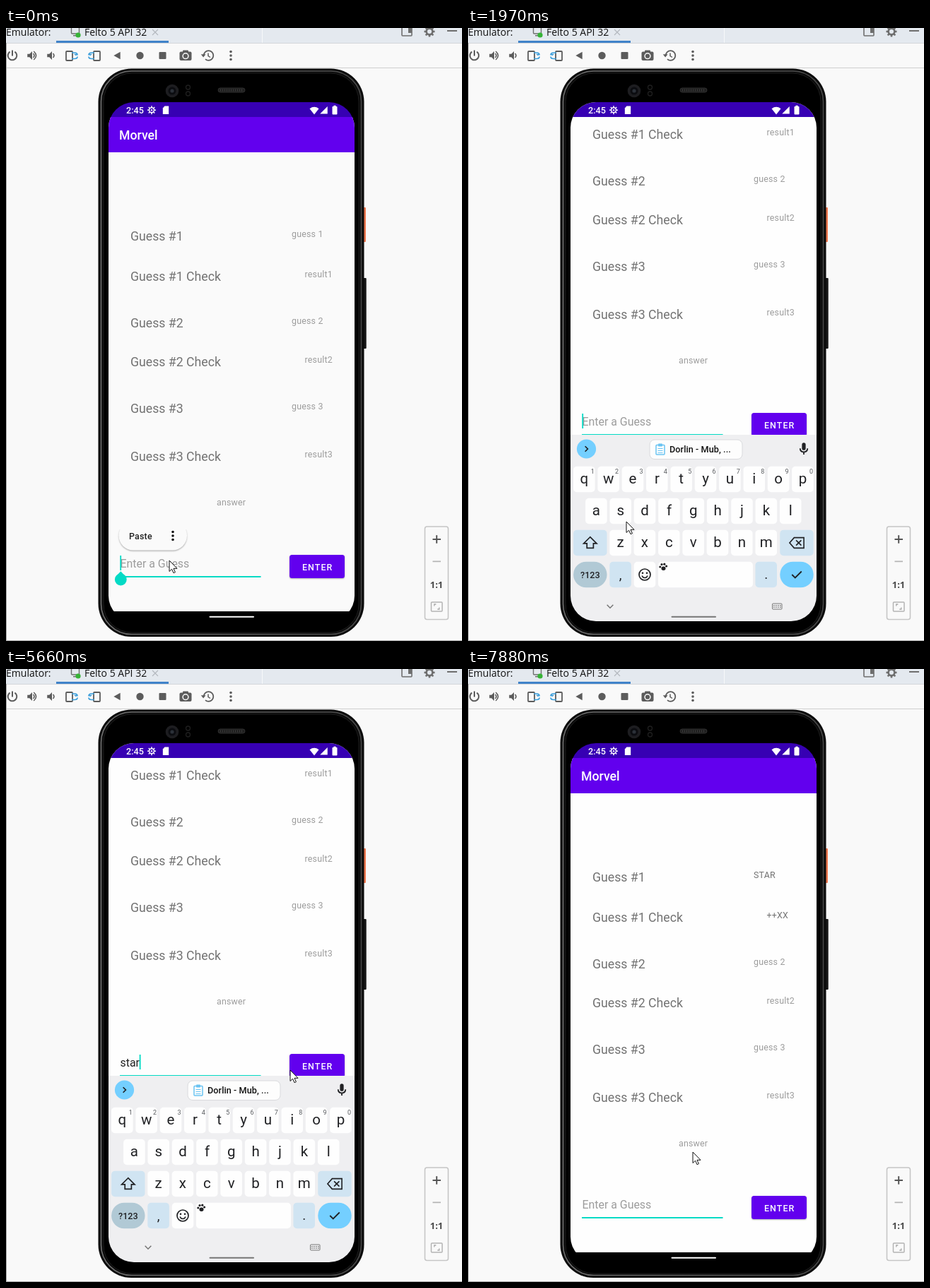
Write an HTML page with a canvas that moves like this. It is 645 px wide and 868 px high and loops after 8000 ms.

```html
<!DOCTYPE html>
<html lang="en">
<head>
<meta charset="utf-8">
<title>Guessing app</title>
<style>
html, body { margin: 0; width: 100%; height: 100%; overflow: hidden; background: #f9f9f9; }
canvas { display: block; width: 645px; height: 868px; }
</style>
</head>
<body>
<canvas id="stage"></canvas>
<script>
const W = 645, H = 868, LOOP = 8000;
const dpr = window.devicePixelRatio || 1;
const stage = document.getElementById('stage');
const layer = document.createElement('canvas');
for (const c of [stage, layer]) { c.width = W * dpr; c.height = H * dpr; }
const main = stage.getContext('2d'), board = layer.getContext('2d');
let g = main;

const PURPLE = '#6200ee', TEAL = '#03dac5', GREY = '#5c5c5c', INK = '#202124';
const SKY = '#74cfff', PALE = '#d0e4f2', HINT = '#9c9c9c', LABEL = '#737373';
const WHITE = '#fefefe', PANEL = '#f9f9f9', EDGE = '#a5a5a5';
const ROBOTO = 'Roboto, sans-serif', UI = '"Open Sans", sans-serif';

// ---------- drawing helpers ----------
function rr(x, y, w, h, r, fill, stroke, lw = 1) {
  g.beginPath();
  g.roundRect(x, y, w, h, r);
  if (fill) { g.fillStyle = fill; g.fill(); }
  if (stroke) { g.strokeStyle = stroke; g.lineWidth = lw; g.stroke(); }
}
function rect(x, y, w, h, fill) { g.fillStyle = fill; g.fillRect(x, y, w, h); }
function dot(x, y, r, fill) {
  g.beginPath(); g.arc(x, y, r, 0, 7);
  g.fillStyle = fill; g.fill();
}
function ring(x, y, r, color, lw, a = 0, b = Math.PI * 2) {
  g.beginPath(); g.arc(x, y, r, a, b);
  g.strokeStyle = color; g.lineWidth = lw; g.stroke();
}
function text(s, x, y, size, color, o = {}) {
  g.font = `${o.weight || 400} ${size}px ${o.font || ROBOTO}`;
  g.textAlign = o.align || 'left';
  g.letterSpacing = (o.gap || 0) + 'px';
  g.fillStyle = color;
  g.fillText(s, x, y);
}
// Path centred on x, y; path units are a 24 by 24 box
function icon(d, x, y, size, color, lw = 0) {
  g.save();
  g.translate(x - size / 2, y - size / 2);
  g.scale(size / 24, size / 24);
  const p = new Path2D(d);
  if (lw) { g.strokeStyle = color; g.lineWidth = lw * 24 / size; g.stroke(p); }
  else { g.fillStyle = color; g.fill(p); }
  g.restore();
}
function shadow(fn, blur, dy, alpha) {
  g.save();
  g.shadowColor = `rgba(0,0,0,${alpha})`;
  g.shadowBlur = blur * dpr;
  g.shadowOffsetY = dy * dpr;
  fn();
  g.restore();
}
function gear(x, y, r, color, lw) {
  ring(x, y, r * .58, color, lw);
  for (let i = 0; i < 8; i++) {
    const a = i * Math.PI / 4, c = Math.cos(a), s = Math.sin(a);
    g.beginPath();
    g.moveTo(x + c * r * .65, y + s * r * .65);
    g.lineTo(x + c * r, y + s * r);
    g.stroke();
  }
}

// ---------- time ----------
const BEATS = [[0, 1], [400, 6], [1180, 6], [1970, 4], [2540, 2], [2810, 5], [3490, 3],
  [3940, 7], [4870, 1], [4990, 5], [5660, 2], [5900, 1], [6050, 2], [6330, 1],
  [6450, 7], [7370, 1], [7490, 3], [7880, 1], [LOOP, 1]];
function snap(t) {
  let i = 0;
  while (BEATS[i + 1][0] <= t) i++;
  const [a, n] = BEATS[i], step = (BEATS[i + 1][0] - a) / n;
  return a + Math.floor((t - a) / step + 1e-6) * step;
}
const clamp = v => Math.max(0, Math.min(1, v));

const SENT = 6330;
const PRESSES = [
  { c: 's', down: 2250, typed: 2390, up: 2530 },
  { c: 't', down: 3485, typed: 3635, up: 3780 },
  { c: 'a', down: 4200, typed: 4330, up: 4460 },
  { c: 'r', down: 5120, typed: 5250, up: 5385 }
];
const BLINKS = [0, 800, ...PRESSES.map(p => p.typed), SENT];
const PATH = [[0, 231, 754], [400, 231, 754], [920, 218, 757], [1180, 216, 755], [1570, 216, 753],
  [1970, 224, 699], [2255, 217, 684], [2540, 217, 684], [2810, 226, 681], [3350, 298, 645],
  [3640, 298, 645], [3790, 250, 663], [3940, 216, 676], [4200, 185, 680], [4471, 186, 680],
  [4870, 250, 643], [5124, 266, 643], [5392, 268, 641], [5660, 402, 568], [5780, 431, 553],
  [5900, 445, 548], [6050, 448, 567], [6450, 448, 567], [7370, 339, 657], [7750, 318, 684],
  [LOOP, 318, 684]];
function pointer(t) {
  let i = 0;
  while (i < PATH.length - 2 && PATH[i + 1][0] <= t) i++;
  const [a, x, y] = PATH[i], [b, u, v] = PATH[i + 1], k = clamp((t - a) / (b - a));
  return [Math.round(x + (u - x) * k), Math.round(y + (v - y) * k)];
}
// Keyboard slide, its opacity, and how far the page is pushed up
function slide(t) {
  if (t < 3000) {
    const p = clamp((t - 850) / 470), k = 1 - p;
    return { dy: Math.round(123 * k ** 1.6), alpha: clamp(p * 1.45), pan: Math.round(201 * (1 - k ** 2.67)) };
  }
  const q = clamp((t - 6250) / 400);
  return { dy: Math.round(124 * q), alpha: clamp(1 - 1.06 * q), pan: Math.round(201 * (1 - q) ** 2.26) };
}

// ---------- emulator window ----------
function toolWindow() {
  rect(0, 0, W, H, PANEL);
  rect(0, 0, W, 21, '#e4e9ef');
  rect(0, 21, W, 1, '#d3d6da');
  rect(0, 56, W, 1, '#cfcfcf');
  rect(362, 0, 1, 21, '#f6f8fa');
  rect(0, 21, 1, H, EDGE);
  rect(0, H - 1, W, 1, EDGE);
  text('Emulator:', 0, 11, 14, '#111', { font: UI });
  text('Felto 5 API 32', 111, 11, 14, '#111', { font: UI });
  rect(71, 18, 159, 3, '#4083c9');
  rr(92.5, -4, 11, 12, 1, null, '#6e6e6e', 1.4);
  rect(95, 10, 5, 1.5, '#6e6e6e');
  dot(102, 10, 3.6, '#36b336');
  icon('M4 4L20 20M20 4L4 20', 211, 6, 12, '#b3b8be', 1.1);
  rr(560, -3, 14, 14, 1, null, '#6e6e6e', 1.6);
  rect(569, -2, 5, 9, '#6e6e6e');
  gear(599, 5, 7.5, '#6e6e6e', 2.6);
  rect(624, 3, 14, 2, '#6e6e6e');

  ring(9, 39, 6.3, GREY, 2, -1, Math.PI + 1);
  rect(8, 31.5, 2, 8, GREY);
  const speaker = 'M3 9v6h4l5 5V4L7 9z';
  icon(speaker, 37, 39, 18, GREY);
  icon('M14 8q4 4 0 8M15 4q9 8 0 16', 37, 39, 18, GREY, 1.6);
  icon(speaker, 65, 39, 18, GREY);
  icon('M14 8q4 4 0 8', 65, 39, 18, GREY, 1.6);
  for (const [x, f] of [[93, 1], [125, -1]]) {
    g.save();
    g.translate(x, 39);
    g.scale(f, 1);
    rr(-8, -6, 9, 13, 1, null, GREY, 1.8);
    icon('M2 4h8q8 0 8 7M2 21h8q8 0 8-6', 5, 0, 12, '#3b9edb', 1.7);
    icon('M4 8h18l-9 8z', 5.5, -1, 8, '#3b9edb');
    g.restore();
  }
  icon('M20 3v18L4 12z', 157, 39, 14, GREY);
  dot(189.5, 39, 5.2, GREY);
  rr(216.5, 34, 10, 10, 1, GREY);
  rr(250, 31.5, 8, 5, 1, GREY);
  rr(245.5, 33.5, 17, 12.5, 2, GREY);
  ring(254, 39.7, 3.9, PANEL, 1.5);
  ring(286.5, 39, 6.8, GREY, 1.8, -Math.PI, 2.3);
  icon('M2 6h18l-9 11z', 279.5, 39.5, 9, GREY);
  icon('M11 5v8l6 4', 286.5, 39, 12, GREY, 1.5);
  for (const y of [33.5, 39, 44.5]) dot(318, y, 1.8, GREY);

  rr(592.5, 706, 33, 131.5, 3, PANEL, '#c6c6c6', 1.6);
  rect(603.5, 723, 11.5, 2, '#555');
  rect(608.2, 718.2, 2, 11.5, '#555');
  rect(603.5, 754.5, 11.5, 1.7, '#b4b4b4');
  text('1:1', 609, 792.5, 13, '#4c4c4c', { weight: 700, align: 'center', font: UI });
  rr(601.5, 813, 15.5, 13, 1, null, '#b4b4b4', 1.5);
  icon('M5 10V5h5M14 19h5v-5', 609.3, 819.5, 12, '#a8a8a8', 1.3);
}

function phone() {
  rr(504, 254, 5, 49, 1, '#ef7850');
  rr(504, 354, 5.7, 100, 1, '#161616');
  rr(130.5, 57.5, 376, 804.5, 47, '#0b0b0b');
  const rim = g.createLinearGradient(131, 0, 506, 0);
  rim.addColorStop(0, '#707070');
  rim.addColorStop(1, '#484848');
  rr(134.5, 61, 368, 797.5, 43, null, rim, 1.6);
  rr(138, 64, 361, 792, 40, '#000', '#1d1d1d', 1);
  dot(235, 89, 9.3, '#1d1d20');
  dot(235, 89, 5.5, '#0b0c10');
  dot(235, 89, 2.6, '#2b3038');
  ring(257.5, 84, 3, '#1f1f1f', 1.3);
  ring(257.5, 93, 3, '#1f1f1f', 1.3);
  rr(300, 85, 38, 6, 3, '#1f1f1f', '#303030', 1);
  g.save();
  g.setLineDash([1, 2]);
  g.strokeStyle = '#3a3a3a'; g.lineWidth = 3;
  g.beginPath(); g.moveTo(303, 88); g.lineTo(335, 88); g.stroke();
  g.restore();
}

// ---------- app ----------
function statusBar() {
  rect(145, 105, 348, 21, '#3700b3');
  text('2:45', 170, 121, 12.6, '#fff', { weight: 500 });
  gear(206, 116.2, 6, '#fff', 1.5);
  dot(206, 116.2, 1.2, '#fff');
  icon('M9 1h11v22H4V7z', 226, 116.2, 12.5, '#fff');
  icon('M0 7q12-9 24 0L12 22z', 436, 117, 13, '#fff');
  icon('M23 1v22H1z', 449.5, 116.3, 11.5, '#fff');
  rr(461.5, 111, 7, 11.5, 1, '#fff');
  rect(463.4, 109.7, 3.2, 2, '#fff');
}

function app(t, pan) {
  const paper = t < 400 ? '#fafafa' : WHITE;
  g.save();
  g.translate(0, -pan);
  rect(145, 126, 348, 700, paper);
  rect(145, 126, 348, 50, PURPLE);
  text('Morvel', 160, 158, 17.7, '#fff', { weight: 500 });

  const sent = t >= SENT;
  [[301, 358], [424, 479], [545, 613]].forEach(([a, b], i) => {
    const n = i + 1, filled = sent && !i, color = filled ? LABEL : HINT;
    text('Guess #' + n, 176, a, 17.7, LABEL);
    text(`Guess #${n} Check`, 176, b, 17.7, LABEL);
    text(filled ? 'STAR' : 'guess ' + n, 404, a - 5, 12.4, color, { gap: .2 });
    text(filled ? '++XX' : 'result' + n, 422.5, b - 5, 12.4, color, { gap: .2 });
  });
  text('answer', 298, 676, 12.4, HINT, { gap: .2 });

  const word = sent ? '' : PRESSES.filter(p => p.typed <= t).map(p => p.c).join('');
  text(word || 'Enter a Guess', 161.5, 764, 15.9, word ? '#212121' : HINT);
  const end = word ? g.measureText(word).width : 0;
  const base = BLINKS.filter(b => b <= t).pop();
  rect(161, 776, 199.5, 2, TEAL);
  if ((t - base) % 1000 < 500) rect(161.3 + end, 747, 1.8, 21, TEAL);

  shadow(() => rr(401, 746, 78, 33, 3.5, PURPLE), 2, 1, .3);
  text('ENTER', 419, 767.7, 12.4, '#fff', { weight: 500, gap: 1.1 });

  if (t < 530) {
    shadow(() => rr(159.5, 698, 96.5, 41.5, 20.5, paper), 2, 1.2, .3);
    rect(160, 690, 96, 20, paper);
    text('Paste', 174, 723.5, 12.4, '#212121', { weight: 500, gap: .2 });
    for (const y of [713.5, 719, 724.5]) dot(236, y, 1.8, '#111');
    dot(162.3, 781, 8.4, TEAL);
    icon('M12 0L22 11H2z', 162.3, 778, 17.5, TEAL);
  }
  g.restore();
}

// ---------- keyboard ----------
const ROWS = [['qwertyuiop', 164.3, 639], ['asdfghjkl', 181.4, 684], ['zxcvbnm', 215.6, 729]];
const PITCH = 34.35;
function keyAt(c) {
  for (const [row, x, y] of ROWS) {
    const i = row.indexOf(c);
    if (i >= 0) return [x + i * PITCH, y];
  }
}
function key(x, y, w, fill, r = 5) { rr(x - w / 2, y - 18.3, w, 36.6, r, fill); }

function keyboard(t) {
  const down = PRESSES.find(p => t >= p.down && t < p.up);
  rect(145, 576, 348, 264, t < SENT ? '#efeff1' : WHITE);
  dot(167.5, 596, 13.6, SKY);
  icon('M9 6l6 6-6 6', 167.5, 596, 15, INK, 1.7);
  icon('M12 14a3 3 0 0 0 3-3V5a3 3 0 0 0-6 0v6a3 3 0 0 0 3 3zM17 11a5 5 0 0 1-10 0H5a7 7 0 0 0 6 6.9V21h2v-3.1a7 7 0 0 0 6-6.9z', 475, 596, 21, INK);
  if (t < SENT) {
    rr(257, 583, 131, 27.5, 7, '#fdfdfd', '#d9dadd', 1);
    rr(266, 590.5, 12, 13.5, 1, null, '#69c3f2', 1.5);
    rr(269, 588.5, 6, 4, 1, '#69c3f2');
    for (const y of [595, 598, 601]) rect(268.5, y, 7, 1, '#69c3f2');
    text('Dorlin - Mub, ...', 285, 600.5, 12.6, '#111', { weight: 500, gap: .1 });
  }
  ROWS.forEach(([row, x0, y], r) => [...row].forEach((c, i) => {
    const x = x0 + i * PITCH, held = down && down.c === c;
    if (!held) key(x, y, 30.6, WHITE);
    text(c, x, y + (r ? 5.7 : 6), 20.5, held ? '#b0b0b2' : INK, { align: 'center' });
    if (!r) text((i + 1) % 10, x + 12, y - 8, 9, held ? '#b0b0b2' : '#55585c', { align: 'center' });
  }));
  key(172.8, 729, 47.5, PALE);
  icon('M12 3L2 13h5v7h10v-7h5z', 172.8, 729, 22, INK, 1.7);
  key(465, 729, 47.5, PALE);
  icon('M8 4h15v16H8L1 12zM11 8l8 8M19 8l-8 8', 465, 729, 22, INK, 1.6);

  key(172.8, 774, 47.5, '#b1c9d5', 18.3);
  text('?123', 172.8, 778.5, 12.6, INK, { align: 'center', weight: 500 });
  key(215.6, 774, 30.6, PALE);
  text(',', 215.6, 781, 19, INK, { align: 'center' });
  key(250, 774, 30.6, WHITE);
  ring(250, 774, 8, INK, 1.7);
  dot(247, 771.7, 1.3, INK);
  dot(253, 771.7, 1.3, INK);
  ring(250, 774.5, 4, INK, 1.6, .25, Math.PI - .25);
  key(335.9, 774, 134, WHITE);
  for (const [x, y] of [[271.8, 763], [274, 759.6], [277.8, 759.2], [280.6, 762]]) dot(x, y, 1.6, INK);
  rr(273.5, 762.5, 6, 5.5, 2.7, INK);
  key(421.7, 774, 30.6, PALE);
  text('.', 421.7, 780, 19, INK, { align: 'center' });
  key(465, 774, 47.5, SKY, 18.3);
  icon('M3 12l6 6L21 6', 465, 774, 18, INK, 1.8);

  if (down) {
    const [x, y] = keyAt(down.c);
    shadow(() => dot(x, y - 49, 26, WHITE), 4, 1, .3);
    text(down.c, x, y - 38, 27, INK, { align: 'center' });
    for (const i of [-1, 0, 1]) dot(x + i * 3.6, y - 28.5, .8, INK);
  }
}

function navBar(t) {
  const shown = t >= 1050 && t < SENT;
  const k = t < SENT ? clamp((t - 1440) / 270) : 1 - clamp((t - 6450) / 300);
  const v = Math.round(255 - 137 * k), color = `rgb(${v},${v},${v})`;
  if (shown) {
    icon('M4 8l8 8 8-8', 201, 819, 13, color, 1.5);
    rr(430.5, 815, 13.5, 8, 1, null, color, 1);
    for (let i = 0; i < 4; i++) {
      rect(432 + i * 3, 817, 1.6, 1.3, color);
      rect(432 + i * 3, 819.5, 1.6, 1.3, color);
    }
  }
  rr(287.5, 832.7, 63.5, 2, 1, color);
}

function arrow(x, y) {
  g.beginPath();
  [[0, 0], [0, 15.5], [3.6, 12.2], [6, 17.7], [8.4, 16.6], [6, 11.3], [11, 11.3]]
    .forEach(([a, b]) => g.lineTo(x + a, y + b));
  g.closePath();
  g.fillStyle = '#fff'; g.fill();
  g.strokeStyle = '#111'; g.lineWidth = 1; g.stroke();
}

function draw(time) {
  const t = snap(time), { dy, alpha, pan } = slide(t);
  g = main;
  g.setTransform(dpr, 0, 0, dpr, 0, 0);
  toolWindow();
  phone();
  g.save();
  g.beginPath();
  g.roundRect(145, 105, 348, 735, 36);
  g.clip();
  rect(145, 105, 348, 735, '#000');
  app(t, pan);
  statusBar();
  if (alpha > 0) {
    g = board;
    g.setTransform(dpr, 0, 0, dpr, 0, 0);
    g.clearRect(0, 0, W, H);
    keyboard(t);
    g = main;
    g.globalAlpha = alpha;
    g.drawImage(layer, 0, dy, W, H);
    g.globalAlpha = 1;
  }
  navBar(t);
  g.restore();
  arrow(...pointer(t));
}

const start = performance.now();
function tick() {
  draw((performance.now() - start) % LOOP);
  requestAnimationFrame(tick);
}
tick();
</script>
</body>
</html>
```
